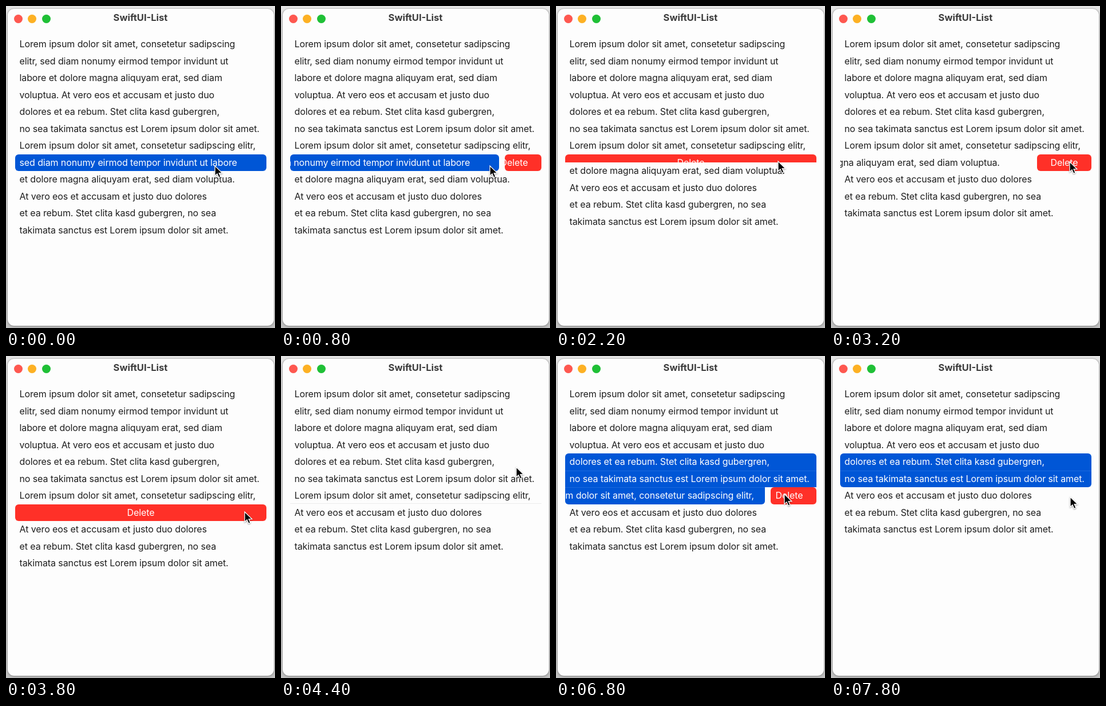
Animation of 470 by 562 pixels, one loop 8000 ms. Source, as an HTML page:

```html
<!DOCTYPE html>
<html lang="en">
<head>
<meta charset="utf-8">
<title>SwiftUI-List</title>
<style>
  html, body { margin: 0; width: 100%; height: 100%; overflow: hidden; }
  body {
    position: relative;
    background: linear-gradient(#e4e4e4, #d8d8d8 60%, #c4c4c4);
    font: 430 16px/29.5px Inter, "Open Sans", sans-serif;
    letter-spacing: -0.1px;
    color: #1e1e1e;
    white-space: pre;
  }
  body * { position: absolute; box-sizing: border-box; }
  #win {
    left: 3px; top: 5px; width: 465px; height: 553px;
    border-radius: 11px; background: #fdfdfd;
    box-shadow: 0 0 2px #888, 0 2px 5px #999;
  }
  h1 {
    left: 0; top: 6px; width: 470px; margin: 0;
    font-size: 16.5px; letter-spacing: 0; text-align: center; color: #3c3c3c;
  }
  .light { top: 14.5px; width: 15px; height: 15px; border-radius: 50%; }
  #list { left: 16px; top: 52px; width: 439px; }
  .row { position: relative; height: 29.5px; overflow: hidden; }
  .face, .del { top: 0; height: 29.5px; overflow: hidden; }
  .face { left: 0; }
  .del { right: 0; border-radius: 6px; background: #ff3028; color: #fff; }
  .del span { right: 0; text-align: center; }
  #rule { left: 16px; top: 257px; width: 439px; height: 1px; background: #ececec; }
  #cursor { left: 0; top: 0; width: 22px; height: 28px; overflow: visible; filter: drop-shadow(0 1px 1px #0006); }
</style>
</head>
<body>
<div id="win"></div>
<h1>SwiftUI-List</h1>
<div class="light" style="left:13.5px;background:#fe5850"></div>
<div class="light" style="left:38px;background:#fdb124"></div>
<div class="light" style="left:62.5px;background:#1fc036"></div>
<div id="list"></div>
<div id="rule"></div>
<svg id="cursor"><path d="M0 0V17.5L4 13.8 6.8 20.3 10 19 7.2 12.6H12.8Z" stroke="#fff" stroke-width="1.3"/></svg>
<script>
const LOOP = 8000, STEP = 200, WIDTH = 439, HEIGHT = 29.5, GAP = 10, REST = 105;

const lines = [
  "Lorem ipsum dolor sit amet, consetetur sadipscing",
  "elitr, sed diam nonumy eirmod tempor invidunt ut",
  "labore et dolore magna aliquyam erat, sed diam",
  "voluptua. At vero eos et accusam et justo duo",
  "dolores et ea rebum. Stet clita kasd gubergren,",
  "no sea takimata sanctus est Lorem ipsum dolor sit amet.",
  "Lorem ipsum dolor sit amet, consetetur sadipscing elitr,",
  "sed diam nonumy eirmod tempor invidunt ut labore",
  "et dolore magna aliquyam erat, sed diam voluptua.",
  "At vero eos et accusam et justo duo dolores",
  "et ea rebum. Stet clita kasd gubergren, no sea",
  "takimata sanctus est Lorem ipsum dolor sit amet."
];

// Per row: swipe start, distance pulled, time of the click on Delete.
const swipes = {
  7: { start: 400, pull: 115, click: 1800 },
  8: { start: 2200, pull: REST, click: 3600 },
  6: { start: 5800, pull: 90, click: 7200 }
};

// The pointer reaches each place at the given time.
const stops = [
  { at: 0, x: 365, y: 279 },
  { at: 1400, x: 388, y: 271 },
  { at: 3200, x: 417, y: 272 },
  { at: 4400, x: 411, y: 194 },
  { at: 5800, x: 399, y: 241 },
  { at: 7600, x: 418, y: 246 }
];

const progress = (t, start, length) => Math.min(1, Math.max(0, (t - start) / length));
const easeOut = p => p * (2 - p);
const smooth = p => p * p * (3 - 2 * p);
const mix = (a, b, p) => a + (b - a) * p;

// Pull open, settle at rest, then slide out once Delete is clicked.
function shiftAt(i, t) {
  if (!swipes[i]) return 0;
  const { start, pull, click } = swipes[i];
  const open = pull * easeOut(progress(t, start, 1000));
  const settled = mix(open, REST, progress(t, start + 1000, 200));
  return mix(settled, WIDTH + GAP, progress(t, click, 200));
}

const collapse = (i, t) => swipes[i] ? progress(t, swipes[i].click + 200, 400) : 0;

function isSelected(i, t) {
  if (collapse(i, t) === 1) return false;
  return i === 7 || i >= 4 && i <= 6 && t >= 4800 + (i - 4) * 400;
}

function pointer(t) {
  let { x, y } = stops[0];
  for (const stop of stops) {
    const p = smooth(progress(t, stop.at - 600, 600));
    x = mix(x, stop.x, p);
    y = mix(y, stop.y, p);
  }
  return `translate(${x}px, ${y}px)`;
}

function add(parent, tag, className = "") {
  const el = document.createElement(tag);
  el.className = className;
  return parent.appendChild(el);
}

const list = document.getElementById("list");
const rule = document.getElementById("rule");
const cursor = document.getElementById("cursor");

const rows = lines.map(line => {
  const row = add(list, "div", "row");
  const face = add(row, "div", "face"), text = add(face, "span");
  const del = add(row, "div", "del"), label = add(del, "span");
  text.textContent = line;
  label.textContent = "Delete";
  return { row, face, text, del, label };
});

function draw(t) {
  rows.forEach(({ row, face, text, del, label }, i) => {
    const shift = shiftAt(i, t);
    const open = Math.max(0, shift - GAP);
    const on = isSelected(i, t);
    const top = isSelected(i - 1, t) ? 0 : 6, bottom = isSelected(i + 1, t) ? 0 : 6;
    row.style.height = HEIGHT * (1 - collapse(i, t)) + "px";
    face.style.width = Math.max(0, WIDTH - shift) + "px";
    face.style.background = on ? "#0056d6" : "none";
    face.style.color = on ? "#fff" : "";
    face.style.borderRadius = `${top}px ${top}px ${bottom}px ${bottom}px`;
    face.style.boxShadow = on && !top ? "inset 0 1px #1a68dc" : "none";
    text.style.left = 7.5 - shift + "px";
    del.style.width = open + "px";
    label.style.width = Math.max(open, REST - GAP) + "px";
  });

  rule.hidden = t < 4200 || t >= 4600;
  cursor.style.transform = pointer(t);
}

function frame() {
  const t = performance.now() % LOOP;
  draw(Math.floor(t / STEP) * STEP);
  requestAnimationFrame(frame);
}
frame();
</script>
</body>
</html>
```
